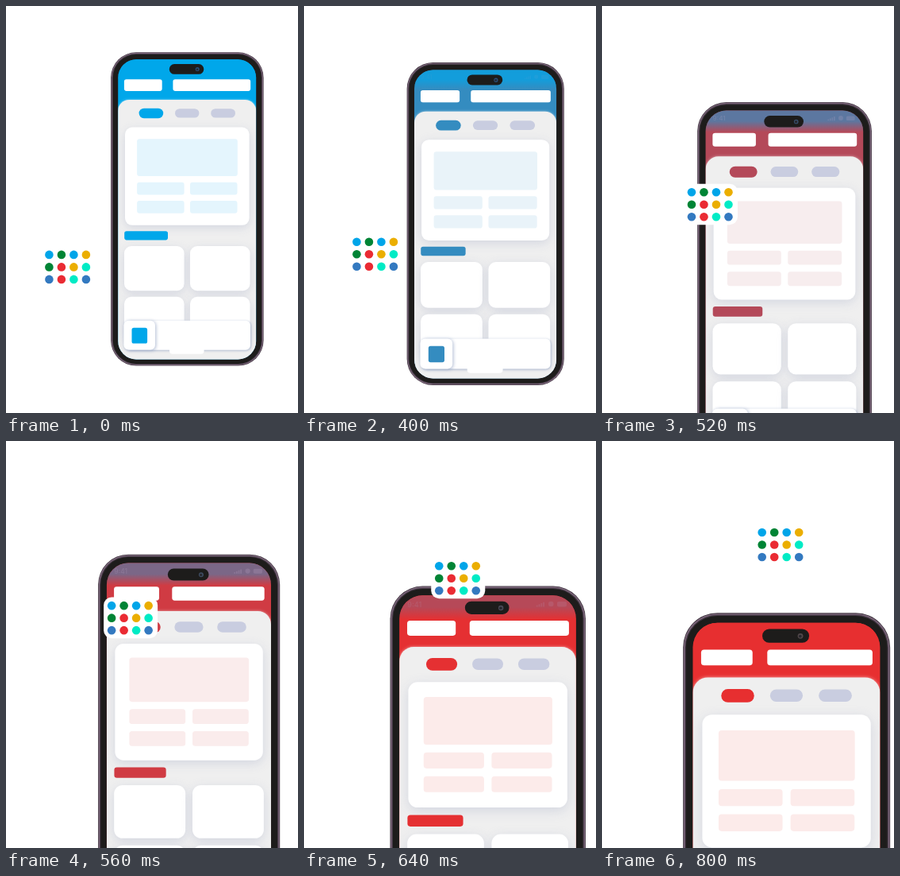
These frames come from a looping animation (368x512 px, 0.84 s). An HTML page with a canvas:

```html
<!DOCTYPE html>
<html lang="en">
<head>
<meta charset="utf-8">
<title>Phone theme switch</title>
<style>
  html, body { margin: 0; width: 100%; height: 100%; overflow: hidden; background: #fff; }
  canvas { display: block; }
</style>
</head>
<body>
<canvas id="stage" width="368" height="512"></canvas>
<script>
const ctx = document.getElementById('stage').getContext('2d');

const LOOP = 840, STEP = 40, START = 300, DURATION = 500;
const ACCENT = [[0, 167, 234], [231, 47, 48]];
const TINT = [[228, 245, 253], [252, 235, 234]];
const LENS = [[38, 82, 128], [82, 72, 74]];
const SHADOW = 'rgba(150,158,190,0.32)';

const DOT_COLORS = {
  c: '#00a5e9', g: '#008435', y: '#ebae00', r: '#ea2b33', t: '#00ebc5', b: '#3379c0'
};
const DOT_ROWS = ['cgcy', 'gryt', 'brtb'];

const lerp = (a, b, k) => a + (b - a) * k;
const mix = ([a, b], k) => a.map((v, i) => Math.round(lerp(v, b[i], k)));
const rgb = (c, alpha = 1) => `rgba(${c.join(',')},${alpha})`;

// cubic-bezier(.42, 0, .58, 1)
function easeInOut(u) {
  if (u <= 0) return 0;
  if (u >= 1) return 1;
  let lo = 0, hi = 1;
  for (let i = 0; i < 30; i++) {
    const m = (lo + hi) / 2, n = 1 - m;
    const x = 3 * n * n * m * 0.42 + 3 * n * m * m * 0.58 + m * m * m;
    if (x < u) lo = m; else hi = m;
  }
  return lo * lo * (3 - 2 * lo);
}

function path(left, top, right, bottom, radius) {
  ctx.beginPath();
  ctx.roundRect(left, top, right - left, bottom - top, radius);
}

function box(left, top, right, bottom, radius, fill) {
  path(left, top, right, bottom, radius);
  ctx.fillStyle = fill;
  ctx.fill();
}

function disc(x, y, r, fill) {
  ctx.beginPath();
  ctx.arc(x, y, r, 0, Math.PI * 2);
  ctx.fillStyle = fill;
  ctx.fill();
}

function withShadow(color, blur, dx, dy, scale, draw) {
  ctx.save();
  ctx.shadowColor = color;
  ctx.shadowBlur = blur * scale;
  ctx.shadowOffsetX = dx * scale;
  ctx.shadowOffsetY = dy * scale;
  draw();
  ctx.restore();
}

function drawBody() {
  const layers = [[0, '#3a303a'], [0.6, '#806a7f'], [1.7, '#443945'], [2.7, '#1d1c1b']];
  for (const [d, color] of layers) {
    box(132.1 + d, 58.2 + d, 324.6 - d, 452.6 - d, 32 - d, color);
  }
}

function drawStatusBar(p) {
  const color = mix(ACCENT, p);
  const fade = ctx.createLinearGradient(0, 67, 0, 91);
  fade.addColorStop(0, rgb(color));
  fade.addColorStop(0.5, rgb(color));
  fade.addColorStop(1, rgb(color, 0));
  ctx.fillStyle = fade;
  ctx.fillRect(140, 66, 176, 26);

  const alpha = p * (1 - p) * 0.9;
  if (alpha < 0.01) return;
  const ink = `rgba(190,170,200,${alpha})`;
  ctx.fillStyle = ink;
  ctx.font = '600 7px Inter, sans-serif';
  ctx.fillText('9:41', 149, 78.5);
  for (let i = 0; i < 4; i++) ctx.fillRect(276 + i * 2.2, 77 - i, 1.5, 1.5 + i);
  disc(290.5, 75.7, 2.6, ink);
  box(296.5, 73.4, 306, 78.4, 1.5, ink);
}

function drawContent(accent, tint, s) {
  const card = (l, t, r, b) =>
    withShadow(SHADOW, 12, 0, 3, s, () => box(l, t, r, b, 9, '#fff'));

  withShadow('rgba(255,255,255,0.55)', 3, 0, 0, s, () =>
    box(141.2, 118, 315.2, 460, [14, 14, 0, 0], '#efefef'));

  box(167.6, 128.8, 198.2, 141.2, 6.2, accent);
  box(213, 129.2, 243.4, 140.6, 5.7, '#c9cde0');
  box(258.2, 129.2, 289, 140.6, 5.7, '#c9cde0');

  card(150, 152.5, 306.6, 275.8);
  box(165.1, 167.2, 291.8, 214, 3, tint);
  for (const y of [221.7, 245]) {
    box(165.1, y, 224.6, y + 15.7, 3, tint);
    box(232, y, 291.5, y + 15.7, 3, tint);
  }

  box(149.2, 283.2, 204, 294.4, 2.8, accent);
  for (const y of [302, 365.8]) {
    card(149, y, 224.6, y + 56.2);
    card(232, y, 307.5, y + 56.2);
  }

  withShadow('rgba(120,140,180,0.6)', 3, 0.8, 0.8, s, () =>
    box(150, 395.8, 308, 432.8, 6, '#fff'));
  box(206, 424, 249.6, 437.8, 4, '#fff');
  withShadow('rgba(120,140,180,0.6)', 4, 1, 0.8, s, () =>
    box(148.4, 395.8, 188, 432.6, 6, '#fff'));
  box(158.5, 404.8, 178.1, 424.6, 2.6, accent);
}

function drawPhone(p) {
  const s = 1 + 0.356 * p;
  const theme = 1 - (1 - p) ** 3;
  const accent = rgb(mix(ACCENT, theme));
  const tint = rgb(mix(TINT, theme));

  ctx.save();
  ctx.translate(-77 * p, 137.4 * p);
  ctx.scale(s, s);
  drawBody();

  ctx.save();
  path(141.2, 67.3, 315.2, 444.4, 23);
  ctx.clip();
  ctx.fillStyle = accent;
  ctx.fillRect(140, 66, 176, 380);
  drawStatusBar(p);
  box(148.9, 92.2, 196.7, 106.9, 2.8, '#fff');
  box(210.4, 92.2, 308.2, 106.9, 2.8, '#fff');
  drawContent(accent, tint, s);
  ctx.restore();

  box(205.8, 73.1, 249.3, 85.8, 6.3, '#1d1c1b');
  disc(241.2, 79.6, 2.5, rgb(mix(LENS, p)));
  disc(241, 79.8, 1.4, '#27262c');
  ctx.restore();
}

function drawDots(p) {
  const x = 54.4 + 147.3 * p, y = 312.9 - 197.9 * p;
  box(x - 10, y - 10.6, x + 58, y + 41, 10, '#fff');
  DOT_ROWS.forEach((row, j) => [...row].forEach((key, i) =>
    disc(x + i * 15.5, y + j * 15.5, 5.3, DOT_COLORS[key])));
}

function render(now) {
  const time = Math.floor((now % LOOP) / STEP) * STEP;
  const p = easeInOut((time - START) / DURATION);
  ctx.fillStyle = '#fff';
  ctx.fillRect(0, 0, 368, 512);
  drawPhone(p);
  drawDots(p);
}

let origin = null;
function tick(now) {
  if (origin === null) origin = now;
  render(now - origin);
  requestAnimationFrame(tick);
}
render(0);
requestAnimationFrame(tick);
</script>
</body>
</html>
```
